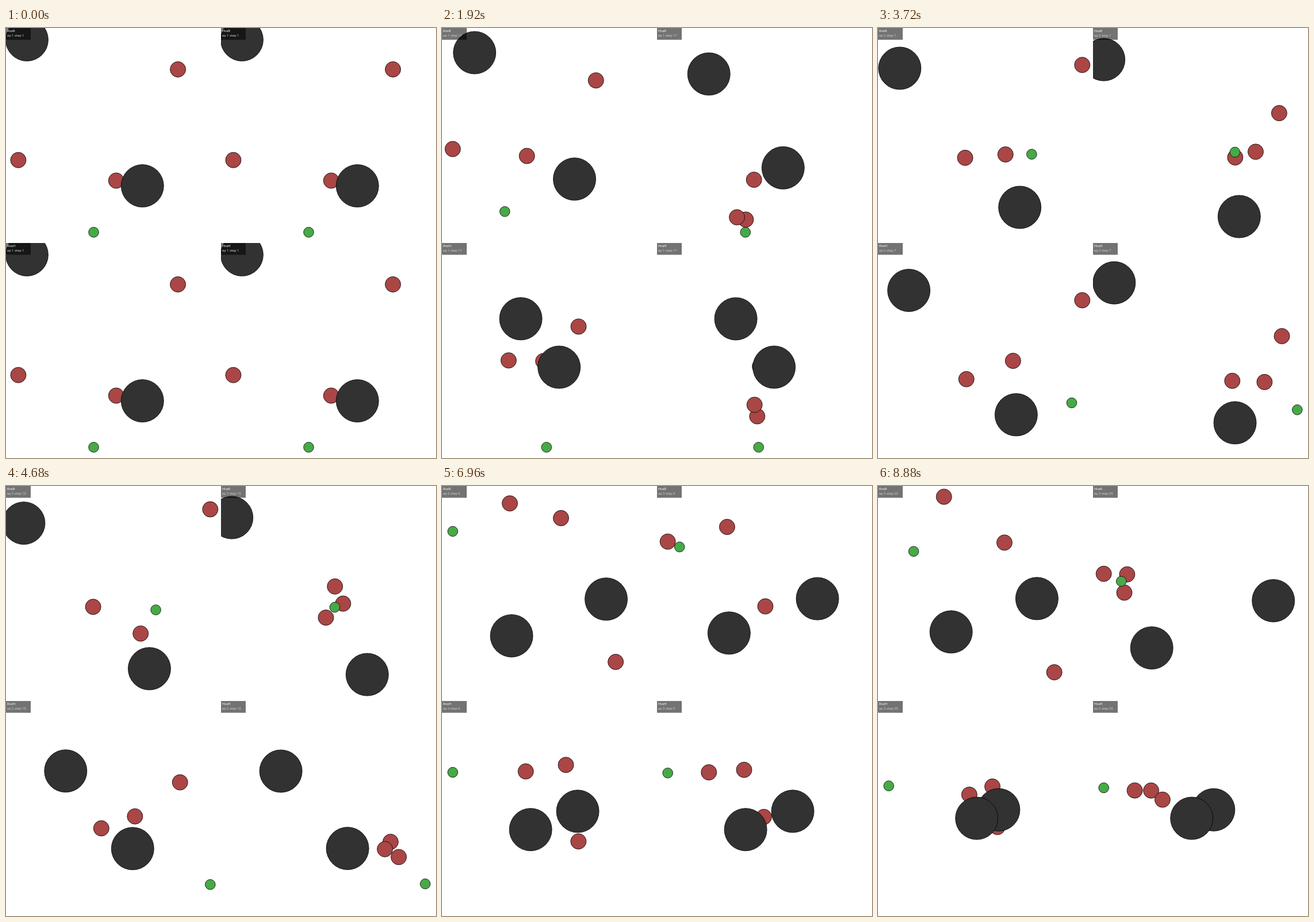
An HTML page with a canvas that plays this animation: 748x748 px, repeating every 9 s.

```html
<!DOCTYPE html>
<html lang="en">
<head>
<meta charset="utf-8">
<title>Pursuit in four panels</title>
<style>
  html, body { margin: 0; width: 100%; height: 100%; overflow: hidden; background: #fff; }
  canvas { display: block; }
</style>
</head>
<body>
<canvas id="stage" width="748" height="748"></canvas>
<script>
const ctx = document.getElementById("stage").getContext("2d");
const PANEL = 374, HALF = PANEL / 2, REACH = HALF * 0.9;
const STEP_MS = 120, STEPS = 25, DT = 0.1;
const DAMPING = 0.25, PUSH = 4, STIFFNESS = 100;

// Sizes and speeds are in world units; `radius` is the drawn size in pixels.
const OBSTACLE = { radius: 37.4, size: 0.2, color: "rgb(50,50,50)" };
const CHASER = { radius: 13.9, size: 0.075, topSpeed: 1, color: "rgb(170,70,70)" };
const RUNNER = { radius: 9.2, size: 0.05, topSpeed: 1.3, color: "rgb(70,170,70)" };
const KINDS = [CHASER, CHASER, CHASER, RUNNER];

// First letter: chasers, last letter: runner. R wanders at random, H follows a heuristic.
const PANELS = ["RvsR", "HvsR", "RvsH", "HvsH"];

// Each wanderer lists the points it drifts through after its start.
const episodes = [
  {
    obstacles: [[-.825, -.912], [.2755, .48]],
    start: [[.614, -.63], [.026, .43], [-.907, .234], [-.189, .922]],
    wander: {
      RvsR: [[[.44, -.7], [.654, -.42]], [[-.386, .123]], [[-1.1, .195], [-.996, .057]], [[-.48, .84], [-.516, .832]]],
      HvsR: [[[-.45, 1.09], [.05, 2.124]]],
      RvsH: [[[.945, -.716]], [[-.27, .31], [0, .3]], [[-1.27, .28], [-.984, .295]]]
    }
  },
  {
    obstacles: [[-.815, -.639], [.326, .683]],
    start: [[.95, -.6], [.2, 0], [-.2, .28], [.48, .2]],
    wander: {
      RvsR: [[[.828, -.882]], [[.18, .36], [.579, .383]], [[-.174, .008]], [[.316, .112]]],
      HvsR: [[[.1, .08], [-.182, .295]]],
      RvsH: [[[1.264, -.336]], [[.385, .22], [.269, -.295]], [[-.213, .379]]]
    }
  },
  {
    obstacles: [[.526, .052], [-.352, .393]],
    start: [[-.34, -.76], [.32, -.78], [.57, .55], [-.98, -.65]],
    wander: {
      RvsR: [[[-.425, -.99]], [[0, -.66], [.194, -.521]], [[.704, .806]], [[-.735, -.431]]],
      HvsR: [[[-.572, -.088]]],
      RvsH: [[[-.647, -.554]], [[.277, -.878]], [[.478, .739]]]
    }
  }
];

const add = (a, b, k = 1) => [a[0] + b[0] * k, a[1] + b[1] * k];
const sub = (a, b) => add(a, b, -1);
const length = v => Math.hypot(...v) || 1e-6;
const resize = (v, size) => v.map(c => c * size / length(v));

function pointAlong(path, progress) {
  const at = progress * (path.length - 1);
  const leg = Math.min(Math.floor(at), path.length - 2);
  return add(path[leg], sub(path[leg + 1], path[leg]), at - leg);
}

// Chasers head for the runner; the runner is repelled by near chasers the most.
function heading(i, positions) {
  const runner = positions[3];
  if (i < 3) return resize(sub(runner, positions[i]), 1);
  const escape = positions.slice(0, 3).reduce((sum, p) => {
    const away = sub(runner, p);
    return add(sum, away, 1 / length(away) ** 2);
  }, [0, 0]);
  return resize(escape, 1);
}

function contactForce(i, positions, obstacles) {
  const others = positions.map((point, j) => ({ point, size: KINDS[j].size })).filter((_, j) => j !== i);
  const blocks = obstacles.map(point => ({ point, size: OBSTACLE.size }));
  return [...others, ...blocks].reduce((force, { point, size }) => {
    const away = sub(positions[i], point);
    const overlap = Math.max(0, size + KINDS[i].size - length(away));
    return add(force, resize(away, overlap * STIFFNESS));
  }, [0, 0]);
}

function simulate({ obstacles, start, wander }, name) {
  const wanders = KINDS.map(kind => (kind === CHASER ? name[0] : name[3]) === "R");
  const routes = [...(wander[name] || [])];
  const paths = start.map((p, i) => wanders[i] && [p, ...routes.shift()]);
  const velocities = start.map(() => [0, 0]);
  const history = [start];

  for (let step = 1; step < STEPS; step++) {
    const now = history[step - 1];
    history.push(now.map((p, i) => {
      if (wanders[i]) return pointAlong(paths[i], step / (STEPS - 1));
      const force = add(contactForce(i, now, obstacles), heading(i, now), PUSH);
      const velocity = add(resize(velocities[i], length(velocities[i]) * (1 - DAMPING)), force, DT);
      velocities[i] = resize(velocity, Math.min(length(velocity), KINDS[i].topSpeed));
      return add(p, velocities[i], DT);
    }));
  }
  return history;
}

const histories = episodes.map(episode => PANELS.map(name => simulate(episode, name)));

function disc([x, y], scale, { radius, color }) {
  ctx.beginPath();
  ctx.arc(HALF + x * scale, HALF + y * scale, radius - 0.4, 0, 2 * Math.PI);
  ctx.fillStyle = color;
  ctx.fill();
  ctx.stroke();
}

function label(name, detail) {
  ctx.fillStyle = "rgba(0,0,0,0.55)";
  ctx.fillRect(0, 0, 43, 20.5);
  ctx.font = "6px Roboto, sans-serif";
  ctx.fillStyle = "#fff";
  ctx.fillText(name, 2, 6.7);
  ctx.fillStyle = "rgb(205,205,205)";
  ctx.fillText(detail, 2, 15);
}

function drawPanel(panel, episode, step) {
  const agents = histories[episode][panel][step];
  const { obstacles } = episodes[episode];
  // The camera zooms so that the farthest body stays in view.
  const scale = REACH / Math.max(...[...agents, ...obstacles].flat().map(Math.abs));

  ctx.save();
  ctx.translate(panel % 2 * PANEL, Math.floor(panel / 2) * PANEL);
  ctx.beginPath();
  ctx.rect(0, 0, PANEL, PANEL);
  ctx.clip();
  ctx.lineWidth = 0.8;
  agents.forEach((p, i) => disc(p, scale, KINDS[i]));
  obstacles.forEach(p => disc(p, scale, OBSTACLE));
  label(PANELS[panel], `ep ${episode + 1} step ${step + 1}`);
  ctx.restore();
}

function draw() {
  const tick = Math.floor(performance.now() / STEP_MS) % (STEPS * episodes.length);
  ctx.fillStyle = "#fff";
  ctx.fillRect(0, 0, 2 * PANEL, 2 * PANEL);
  PANELS.forEach((_, panel) => drawPanel(panel, Math.floor(tick / STEPS), tick % STEPS));
  requestAnimationFrame(draw);
}
draw();
</script>
</body>
</html>
```
